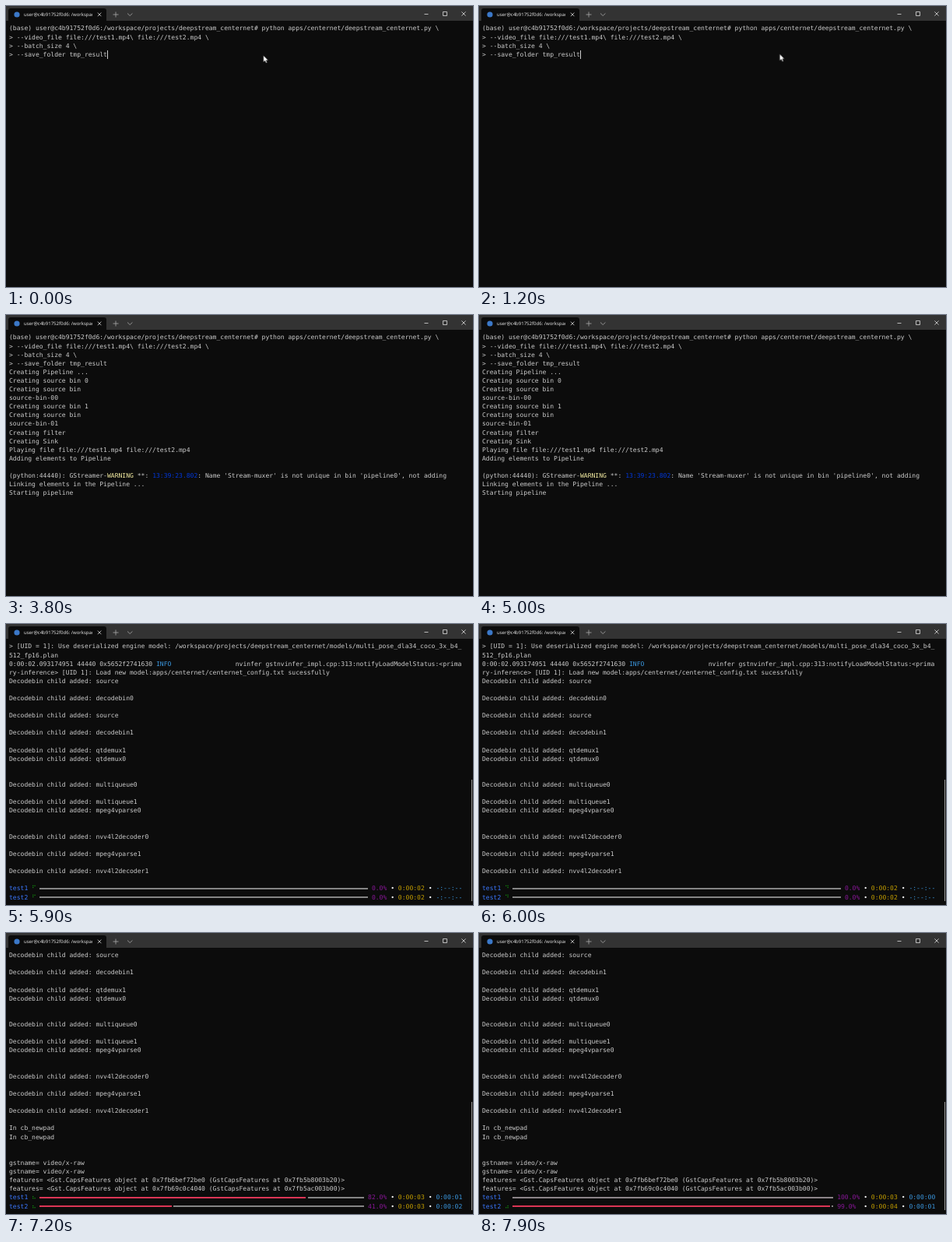
Animation, 600 px wide and 361 px high, one loop 8 s. Source, as an HTML page:

```html
<!DOCTYPE html>
<html lang="en">
<head>
<meta charset="utf-8">
<title>Terminal</title>
<style>
  html { --col: 4.853px; --row: 11.11px; --top: 23.4px; }
  html, body { margin: 0; width: 100%; height: 100%; overflow: hidden; background: #0c0c0c; }
  #stage { position: relative; width: 600px; height: 361px; overflow: hidden; background: #0c0c0c; }
  #stage * { position: absolute; }
  #stage pre, #bars {
    margin: 0; left: 4px; top: 0; color: #ccc; white-space: pre;
    font: 8.06px/var(--row) "DejaVu Sans Mono", "DejaVu Sans", monospace;
    text-rendering: geometricPrecision; font-kerning: none; font-variant-ligatures: none;
  }
  #stage pre span { position: static; }
  #chrome { left: 0; top: 0; }
  #title {
    left: 23px; top: 5px; width: 88px; height: 13px; overflow: hidden; white-space: nowrap; color: #eee;
    font: 6.03px/13px "Open Sans", "Noto Sans", sans-serif; text-rendering: geometricPrecision;
  }
  #view { left: 0; top: var(--top); width: 600px; height: calc(var(--row) * 30); }
  #shell { animation: shell 8s step-end infinite; }
  #output { animation: output 8s step-end infinite; }
  #job { width: 600px; height: 100%; animation: job 8s step-end infinite; }
  #clip { width: 600px; height: calc(var(--row) * 28); overflow: hidden; }
  #log { animation: scroll 8s step-end infinite; }
  #bars span { top: calc(var(--row) * var(--y)); left: calc(var(--col) * var(--x)); }
  #bars i { height: 2px; left: calc(var(--col) * 8); top: calc(var(--row) * (var(--y) + .5) - 1px); }
  #thumb { left: 598px; width: 1px; background: #9c9c9c; animation: thumb 8s step-end infinite; }
  #caret { width: 1px; height: 11px; background: #ccc; }
  #pointer { left: 0; top: 0; animation: pointer 8s linear infinite, hide 8s step-end infinite; }
  .blue { color: #0037da; } .yellow { color: #f9f1a5; } .cyan { color: #3a96dd; }

  @keyframes shell { 0% { visibility: visible } 73.75%, 100% { visibility: hidden } }
  @keyframes output { 0% { visibility: hidden } 42.5% { visibility: visible } 73.75%, 100% { visibility: hidden } }
  @keyframes job { 0% { visibility: hidden } 73.75%, 100% { visibility: visible } }
  @keyframes scroll { 0% { transform: none } 78.75%, 100% { transform: translateY(calc(var(--row) * -8)) } }
  @keyframes thumb { 0% { top: 176.6px; height: 156px } 78.75%, 100% { top: 193.6px; height: 139px } }
  @keyframes hide { 0% { visibility: visible } 38.75%, 100% { visibility: hidden } }
  @keyframes pointer {
    0% { transform: translate(330px, 63px) }
    2.5% { transform: translate(356px, 67px) }
    5%, 7.5% { transform: translate(391px, 62px) }
    17.5% { transform: translate(384px, 61px) }
    22.5% { transform: translate(427px, 323px) }
    28.75%, 100% { transform: translate(435px, 272px) }
  }
</style>
</head>
<body>
<div id="stage">
  <svg id="chrome" width="600" height="20" fill="none" stroke="#ddd" stroke-width=".8">
    <rect width="600" height="19" fill="#333" stroke="none"/>
    <path d="M3 20V6q0-3 3-3H126q3 0 3 3V20z" fill="#0c0c0c" stroke="none"/>
    <circle cx="14" cy="11" r="3.6" fill="#3b78c8" stroke="none"/>
    <path d="M117.8 8.6l4.6 4.6m0-4.6l-4.6 4.6"/>
    <path d="M137.5 11h7m-3.5-3.5v7M156 9.5l3.2 3 3.2-3" stroke="#aaa"/>
    <path d="M537.5 10.5h5M561.5 7.5h5v5h-5zM585.4 7.4l5.2 5.2m0-5.2l-5.2 5.2"/>
  </svg>
  <div id="title">user@c4b91752f0d6: /workspace</div>

  <div id="view">
    <div id="shell"><pre>(base) user@c4b91752f0d6:/workspace/projects/deepstream_centernet# python apps/centernet/deepstream_centernet.py \
&gt; --video_file file:///test1.mp4\ file:///test2.mp4 \
&gt; --batch_size 4 \
&gt; --save_folder tmp_result</pre></div>
    <div id="output"><pre style="top:calc(var(--row)*4)">Creating Pipeline ...
Creating source bin 0
Creating source bin
source-bin-00
Creating source bin 1
Creating source bin
source-bin-01
Creating filter
Creating Sink
Playing file file:///test1.mp4 file:///test2.mp4
Adding elements to Pipeline

(python:44440): GStreamer-<span class="yellow">WARNING</span> **: <span class="blue">13:39:23.802</span>: Name 'Stream-muxer' is not unique in bin 'pipeline0', not adding
Linking elements in the Pipeline ...
Starting pipeline</pre></div>
    <div id="job">
      <div id="clip"><pre id="log"></pre></div>
      <div id="bars"></div>
      <div id="thumb"></div>
    </div>
  </div>

  <div id="caret"></div>
  <svg id="pointer" width="9" height="13">
    <path d="M.6.4V9L2.6 7.2 4 10.2 5.4 9.6 4.1 6.7H6.7z" fill="#fff" stroke="#000" stroke-width=".4"/>
  </svg>
</div>

<script>
const $ = id => document.getElementById(id);
const COL = 4.853, ROW = 11.11, TOP = 23.4;
const SPINNER = '⠋⠙⠹⠸⠼⠴⠦⠧⠇⠏';

// A number means that many blank lines.
const children = ['source', 1, 'decodebin0', 1, 'source', 1, 'decodebin1', 1, 'qtdemux1', 'qtdemux0', 2,
  'multiqueue0', 1, 'multiqueue1', 'mpeg4vparse0', 2, 'nvv4l2decoder0', 1, 'mpeg4vparse1', 1, 'nvv4l2decoder1', 1];
$('log').innerHTML = [
  '&gt; [UID = 1]: Use deserialized engine model: /workspace/projects/deepstream_centernet/models/multi_pose_dla34_coco_3x_b4_',
  '512_fp16.plan',
  '0:00:02.093174951 44440 0x5652f2741630 <span class="cyan">INFO</span>' + ' '.repeat(17) +
    'nvinfer gstnvinfer_impl.cpp:313:notifyLoadModelStatus:&lt;prima',
  'ry-inference&gt; [UID 1]: Load new model:apps/centernet/centernet_config.txt sucessfully',
  ...children.flatMap(c => typeof c === 'number' ? Array(c).fill('') : 'Decodebin child added: ' + c),
  'In cb_newpad', 'In cb_newpad', '', '',
  'gstname= video/x-raw', 'gstname= video/x-raw',
  'features= &lt;Gst.CapsFeatures object at 0x7fb6bef72be0 (GstCapsFeatures at 0x7fb5b8003b20)&gt;',
  'features= &lt;Gst.CapsFeatures object at 0x7fb69c0c4040 (GstCapsFeatures at 0x7fb5ac003b00)&gt;'
].join('\n');

const cell = (x, y, color, text) => `<span style="--x:${x};--y:${y};color:${color}">${text}</span>`;
const clock = s => '0:00:0' + s;

function barRow(y, name, pct, width, elapsed, left, spin) {
  const halves = Math.floor(width * 2 * pct / 100);
  const done = halves * COL / 2;
  const gap = halves ? done + COL / 2 : 0;
  const fill = pct < 100
    ? `linear-gradient(90deg,#dc3555 ${done}px,#0000 ${done}px ${gap}px,#858585 ${gap}px)`
    : '#8c8488';
  return cell(0, y, '#3b78ff', name) +
    (pct < 100 ? cell(6, y, '#13a10e', spin) : '') +
    `<i style="--y:${y};width:${width * COL}px;background:${fill}"></i>` +
    cell(width + 9, y, '#881798', pct.toFixed(1) + '%') +
    cell(101, y, '#f2f2f2', '•') + cell(103, y, '#c19c00', clock(elapsed)) +
    cell(111, y, '#f2f2f2', '•') + cell(113, y, '#3a96dd', pct ? clock(left) : '-:--:--');
}

function drawBars(t) {
  const begin = 6500, rate = 82 / 700, end = begin + 100 / rate;
  const raw = Math.max(0, Math.min(100, (t - begin) * rate));
  const first = Math.round(raw);
  const second = t < end ? first / 2 : Math.round(100 + 98 * (t - end) / (7900 - end)) / 2;
  const width = 90 - first.toFixed(1).length;
  const elapsed = t < 6700 ? 2 : t < 7700 ? 3 : 4;
  const spin = SPINNER[Math.floor(Math.max(0, t - 5900) / 80 + .25) % 10];
  $('bars').innerHTML =
    barRow(28, 'test1', first, width, Math.min(3, elapsed), first < 100 ? 1 : 0, spin) +
    barRow(29, 'test2', second, width, elapsed, t < end ? 2 : 1, spin);
}

function drawCaret(t) {
  const enter = 3100;
  const on = t < 5900 && (t < enter ? t : t - enter) % 1060 < 530;
  const [col, row] = t < enter ? [26, 3] : t < 3400 ? [0, 4] : [0, 19];
  const style = $('caret').style;
  style.visibility = on ? 'visible' : 'hidden';
  style.left = 4 + col * COL + 'px';
  style.top = TOP + row * ROW + 'px';
}

let start, last;
function frame(now) {
  start ??= now;
  const t = Math.floor((now - start) % 8000 / 100) * 100;
  if (t !== last) {
    drawBars(t);
    drawCaret(t);
    last = t;
  }
  requestAnimationFrame(frame);
}
requestAnimationFrame(frame);
</script>
</body>
</html>
```
